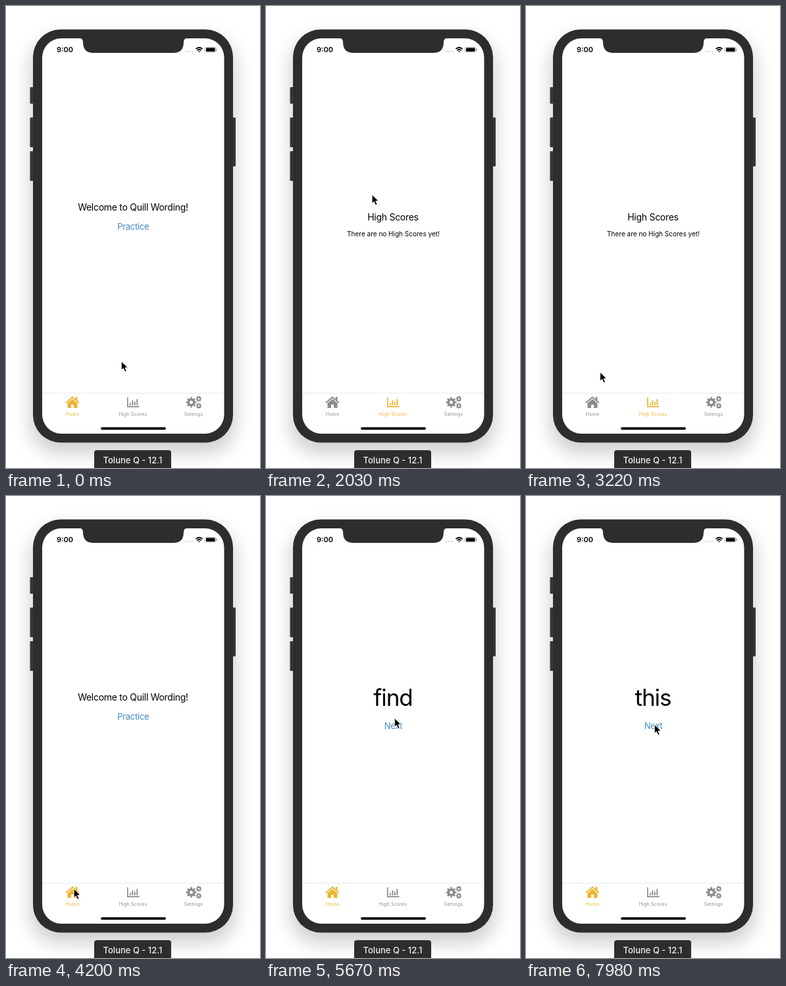
Recreate the animation shown at these times as an HTML page. Size 386 by 700 pixels, loop 8 s.

```html
<!DOCTYPE html>
<html lang="en">
<head>
<meta charset="utf-8">
<title>Reading practice demo</title>
<style>
  html, body { margin: 0; width: 100%; height: 100%; overflow: hidden; background: #fff; }
  svg { display: block; width: 386px; height: 700px; }
  text { font-family: Inter, Roboto, sans-serif; text-anchor: middle; }
  .body { fill: #2d2d2d; }
  .title { font-size: 14px; letter-spacing: -.02em; }
  .link { font-size: 13px; letter-spacing: -.02em; fill: #4189c2; }
  .word { font-size: 35px; letter-spacing: -.03em; }
  .tab { fill: #8b8b8b; stroke: #8b8b8b; }
  .tab.active { fill: #ecb530; stroke: #ecb530; }
  .tab text { font-size: 7px; letter-spacing: .03em; stroke: none; }
  .line { fill: none; }
  .solid { stroke: none; }
</style>
</head>
<body>
<svg viewBox="0 0 386 700">
  <defs>
    <filter id="blur" x="-30%" y="-20%" width="160%" height="140%"><feGaussianBlur stdDeviation="14"/></filter>
    <g id="cog" class="line">
      <circle r="4.3" stroke-width="3.6"/>
      <circle r="6.8" stroke-width="2.2" pathLength="16" stroke-dasharray="1" stroke-dashoffset=".5"/>
    </g>
  </defs>

  <!-- phone -->
  <rect x="37" y="48" width="312" height="630" rx="44" opacity=".19" filter="url(#blur)"/>
  <g fill="#363636">
    <rect x="36.5" y="123" width="6" height="25" rx="1"/>
    <rect x="36.5" y="169" width="6" height="45" rx="1"/>
    <rect x="36.5" y="220" width="6" height="45" rx="1"/>
    <rect x="343" y="169" width="6" height="74" rx="1"/>
  </g>
  <rect class="body" x="41" y="35.500" width="304" height="626" rx="42"/>
  <rect x="55" y="49" width="276.500" height="599" rx="29" fill="#fff"/>
  <path class="body" d="M111 48.500q6 .5 6 6c0 11 5 16.500 16 16.500h121c11 0 16-5.500 16-16.500q0-5.500 6-6z"/>

  <!-- status bar -->
  <text x="89.500" y="70" font-size="11" font-weight="600">9:00</text>
  <path d="M272.500 69h12" stroke="#c4c4c4" stroke-width="1.500" stroke-dasharray="2 1.300"/>
  <g fill="none" stroke="#000" stroke-width="1.700">
    <path d="M288.500 65.200q5-4.400 10 0"/>
    <path d="M290.400 67.300q3.100-2.600 6.200 0"/>
    <path d="M292.500 69.300h2" stroke-width="1.400"/>
  </g>
  <rect x="302.500" y="62.500" width="16.500" height="7.500" rx="2" fill="none" stroke="#999" stroke-width=".8"/>
  <rect x="304" y="63.600" width="13.600" height="5.300" rx="1"/>
  <path d="M320.300 65v2.500" stroke="#888"/>

  <!-- pages -->
  <g id="home">
    <text class="title" x="193" y="309.500">Welcome to Quill Wording!</text>
    <text class="link" x="193.300" y="339.300" id="practice">Practice</text>
  </g>
  <g id="scores">
    <text class="title" x="193" y="324.500">High Scores</text>
    <text x="193.500" y="349" font-size="10">There are no High Scores yet!</text>
  </g>
  <g id="reading">
    <text class="word" x="193" y="317.500" id="word"></text>
    <text class="link" x="193.500" y="352.500" id="next">Next</text>
  </g>

  <!-- tab bar -->
  <path d="M55 586.500h276.500" stroke="#e8e8e8"/>
  <g class="tab" id="homeTab">
    <path class="line" d="M91 601.300L101 592.800L111 601.300" stroke-width="2"/>
    <path class="solid" d="M93.500 601.800L101 595.500L108.500 601.800V609H103V604H99V609H93.500zM105.800 592.300H108.500V598L105.800 595.800z"/>
    <text x="101" y="621">Home</text>
  </g>
  <g class="tab" id="scoresTab">
    <path class="line" d="M184.800 593V607.200H202.500" stroke-width="1.700"/>
    <path class="line" d="M188.800 601.500V605M192.300 597.500V605M195.800 599.500V605M199.300 595.500V605" stroke-width="1.900"/>
    <text x="193" y="621">High Scores</text>
  </g>
  <g class="tab">
    <use href="#cog" x="281.500" y="600.500"/>
    <use href="#cog" transform="translate(293 595.200) scale(.55)"/>
    <use href="#cog" transform="translate(293 605.800) scale(.55)"/>
    <text x="285.200" y="621">Settings</text>
  </g>
  <rect x="144" y="638.200" width="99" height="3.800" rx="1.900"/>

  <!-- device label -->
  <rect class="body" x="134" y="673" width="117" height="40" rx="4"/>
  <text x="192.500" y="692.500" font-size="13" font-weight="500" fill="#f2f2f2">Tolune Q - 12.1</text>

  <!-- pointer -->
  <g id="pointer">
    <circle id="ring" cy=".9" r="21.300" fill="none" stroke="#000" stroke-width="1.600"/>
    <path d="M.3 .3V13.800L3.400 11L5.700 16.300L8.200 15.200L5.900 10.100L10.100 9.900z" stroke="#fff" stroke-width=".9" stroke-linejoin="round"/>
  </g>
</svg>
<script>
const LOOP = 8000, STEP = 70;
const RELEASE = 2 * STEP; // from press to release
const FADE = 5 * STEP;
const el = id => document.getElementById(id);
const clamp = (v, low, high) => Math.min(high, Math.max(low, v));
const smooth = k => k * k * (3 - 2 * k);
const show = (id, on) => el(id).style.display = on ? '' : 'none';

// Resting points the pointer travels between.
const start = { x: 175, y: 538 };
const homeTab = { x: 101, y: 600 };
const scoresTab = { x: 192, y: 600 };
const practice = { x: 195, y: 335 };
const next = { x: 195, y: 346 };

// Quick laps around the empty score list.
function lap(t) {
  const angle = 2 * Math.PI * (clamp(t, 1820, 2870) - 2030) / 530 - 1.8;
  return { x: 184 + 102 * Math.cos(angle), y: 338 + 54 * Math.sin(angle) };
}

const moves = [
  { from: 350, to: 630, goal: () => scoresTab },
  { from: 1260, to: 1820, goal: lap },
  { from: 3010, to: 3310, goal: () => homeTab },
  { from: 4130, to: 4970, goal: () => practice },
  { from: 5600, to: 5950, goal: () => next }
];

const clicks = [
  { at: 770, page: 'scores' },
  { at: 3570, page: 'home' },
  { at: 5040, page: 'reading', word: 'find' },
  { at: 6090, page: 'reading', word: 'way' },
  { at: 6860, page: 'reading', word: 'had' },
  { at: 7630, page: 'reading', word: 'this' }
];

function pointerAt(t) {
  return moves.reduce((pos, { from, to, goal }) => {
    const k = smooth(clamp((t - from) / (to - from), 0, 1));
    const end = goal(t);
    return { x: pos.x + (end.x - pos.x) * k, y: pos.y + (end.y - pos.y) * k };
  }, start);
}

const lastClick = t => clicks.filter(c => c.at <= t).pop();

function draw(t) {
  const { x, y } = pointerAt(t);
  el('pointer').setAttribute('transform', `translate(${x} ${y})`);

  const sincePress = t - (lastClick(t)?.at ?? -Infinity);
  show('ring', sincePress < RELEASE);

  const { page, word = '' } = lastClick(t - RELEASE) || { page: 'home' };
  for (const id of ['home', 'scores', 'reading']) show(id, id === page);
  el('scoresTab').classList.toggle('active', page === 'scores');
  el('homeTab').classList.toggle('active', page !== 'scores');
  el('word').textContent = word;

  // A pressed link dims and recovers.
  const dim = Math.sin(Math.PI * clamp(sincePress / FADE, 0, 1));
  el('practice').style.opacity = el('next').style.opacity = 1 - dim / 2;
}

const began = performance.now();
function frame(now) {
  const t = Math.max(0, now - began) % LOOP;
  draw(Math.floor(t / STEP) * STEP);
  requestAnimationFrame(frame);
}
draw(0);
requestAnimationFrame(frame);
</script>
</body>
</html>
```
